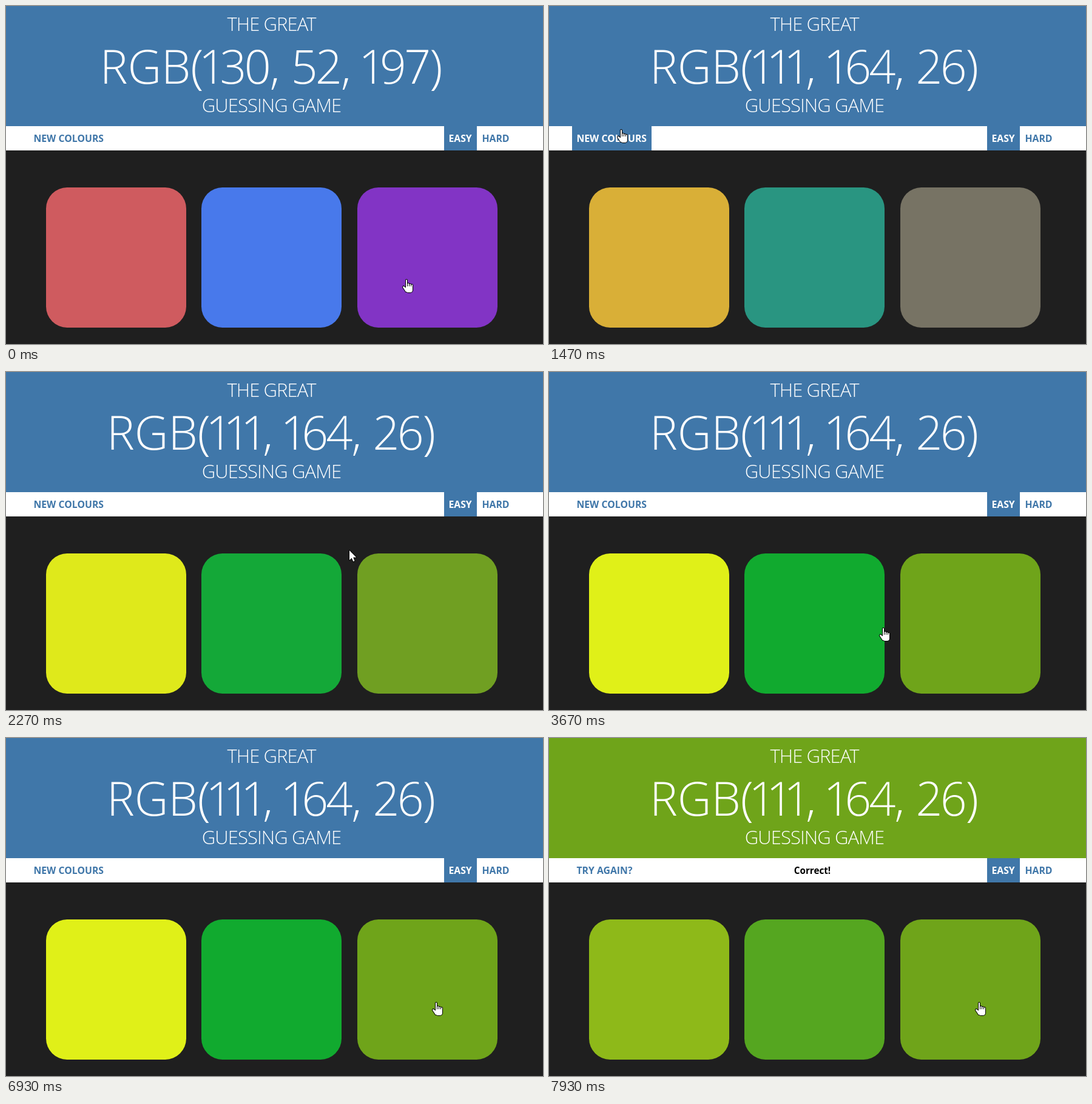
Write an HTML page with a canvas that moves like this. It is 885 px wide and 557 px high and loops after 8 s.

```html
<!DOCTYPE html>
<html lang="en">
<head>
<meta charset="utf-8">
<title>Colour guessing game</title>
<style>
html, body { margin: 0; width: 100%; height: 100%; overflow: hidden; background: #1f1f1f; }
canvas { display: block; }
</style>
</head>
<body>
<canvas id="stage" width="885" height="557"></canvas>
<script>
const ctx = document.getElementById('stage').getContext('2d');
const LOOP = 8000, FADE = 2000, NEW_AT = 815, WIN_AT = 7070;
const BLUE = '#4077a9', FONT = '"Open Sans", "Noto Sans", sans-serif';
const SIZE = 231, TOP = 299, RADIUS = SIZE * .15;
const TILES = [
  { from: [207, 91, 95], to: [224, 240, 24] },
  { from: [72, 121, 235], to: [17, 170, 47] },
  { from: [130, 52, 197], to: [111, 164, 26] }
];
TILES.forEach((tile, i) => tile.x = Math.floor(66 + i * 256.5));
const { from: FIRST, to: GOAL } = TILES[2];

// pointer stops: time, x, y
const PATH = [
  [30, 659, 451], [520, 118, 204], [1470, 118, 204], [2270, 566, 294],
  [2900, 640, 511], [3200, 704, 342], [3670, 550, 422], [3870, 315, 536],
  [4400, 731, 380], [4930, 524, 430], [5530, 469, 420], [6350, 249, 400],
  [6800, 596, 436], [6930, 708, 436]
];

const ARROW = new Path2D('M0 0V16L3.7 12.5L6.2 18.3L8.6 17.3L6.2 11.6H11.3Z');
const HAND = new Path2D('M8 21H6L1 13.5L2 11.5L8 16Z');
for (let i = 0; i < 4; i++) {
  const top = i ? 6 + i : 1;
  HAND.roundRect(6 + 3 * i, top, 2, 17 - top, 1);
}
HAND.roundRect(6, 12, 11, 10, [0, 0, 4, 4]);

const rgb = c => `rgb(${c.map(Math.round)})`;
const mix = (a, b, k) => a.map((v, i) => v + (b[i] - v) * k);
const inside = ([px, py], x, y, w, h) => px >= x && px < x + w && py >= y && py < y + h;

// cubic-bezier(.25, .1, .25, 1)
function ease(t) {
  if (t <= 0) return 0;
  if (t >= 1) return 1;
  const curve = (a, b, s) => 3 * a * s * (1 - s) ** 2 + 3 * b * s * s * (1 - s) + s ** 3;
  let lo = 0, hi = 1;
  for (let i = 0; i < 20; i++) {
    const mid = (lo + hi) / 2;
    if (curve(.25, .25, mid) < t) lo = mid; else hi = mid;
  }
  return curve(.1, 1, lo);
}

function pointerAt(t) {
  const next = PATH.findIndex(stop => stop[0] > t);
  const b = PATH.at(next), a = next > 0 ? PATH[next - 1] : b;
  const k = a === b ? 1 : (1 - Math.cos(Math.PI * (t - a[0]) / (b[0] - a[0]))) / 2;
  return mix(a, b, k).slice(1);
}

function box(x, y, w, h, fill) {
  ctx.fillStyle = fill;
  ctx.fillRect(x, y, w, h);
}

function text(str, x, y, font, fill, align = 'left', spacing = 0) {
  ctx.font = `${font} ${FONT}`;
  ctx.letterSpacing = `${spacing}px`;
  ctx.fillStyle = fill;
  ctx.textAlign = align;
  ctx.fillText(str, x, y);
}

const heading = (str, y) => text(str, 437.5, y, '350 31px', '#fff', 'center', -.9);

// tight figures, with "1" pulled in on both sides
function bigTitle(str) {
  const font = '340 77px';
  ctx.font = `${font} ${FONT}`;
  ctx.letterSpacing = '0px';
  let x = 0;
  const glyphs = [...str].map(ch => {
    const trim = ch === '1' ? 7.5 : /\d/.test(ch) ? 1.8 : 0;
    const at = x - trim;
    x += ctx.measureText(ch).width - 2 * trim;
    return [ch, at];
  });
  const left = 437 - x / 2;
  glyphs.forEach(([ch, at]) => text(ch, left + at, 128, font, '#fff'));
}

function button(str, x, w, on) {
  if (on) box(x, 198, w, 40, BLUE);
  text(str, x + 7.4, 224, '700 15.8px', on ? '#fff' : BLUE);
}

function drawPointer([x, y], hand) {
  const shape = hand ? HAND : ARROW;
  ctx.save();
  ctx.translate(Math.round(x) - (hand ? 6 : 0), Math.round(y) - (hand ? 1 : 0));
  ctx.strokeStyle = '#000';
  ctx.fillStyle = '#fff';
  ctx.lineWidth = 2;
  ctx.lineJoin = 'round';
  ctx.stroke(shape);
  ctx.fill(shape);
  ctx.restore();
}

function draw(t) {
  const won = t >= WIN_AT;
  const pointer = pointerAt(t);
  const hover = inside(pointer, 38, 198, 131, 40);
  const overTile = TILES.some(tile => inside(pointer, tile.x, TOP, SIZE, SIZE));

  box(0, 0, 885, 557, '#1f1f1f');
  box(0, 0, 885, 198, won ? rgb(GOAL) : BLUE);
  box(0, 198, 885, 40, '#fff');

  heading('THE GREAT', 41);
  bigTitle(`RGB(${(t < NEW_AT ? FIRST : GOAL).join(', ')})`);
  heading('GUESSING GAME', 175);

  button(won ? 'TRY AGAIN?' : 'NEW COLOURS', 38, 131, hover);
  button('EASY', 722, 54, true);
  button('HARD', 777, 60, false);
  if (won) text('Correct!', 434, 224, '700 15.2px', '#000', 'center');

  const fresh = ease((t - NEW_AT) / FADE), win = ease((t - WIN_AT) / FADE);
  for (const { x, from, to } of TILES) {
    ctx.fillStyle = rgb(mix(mix(from, to, fresh), GOAL, win));
    ctx.beginPath();
    ctx.roundRect(x, TOP, SIZE, SIZE, RADIUS);
    ctx.fill();
  }

  drawPointer(pointer, hover || overTile);
}

const start = performance.now();
function tick() {
  draw((performance.now() - start) % LOOP);
  requestAnimationFrame(tick);
}
tick();
</script>
</body>
</html>
```
